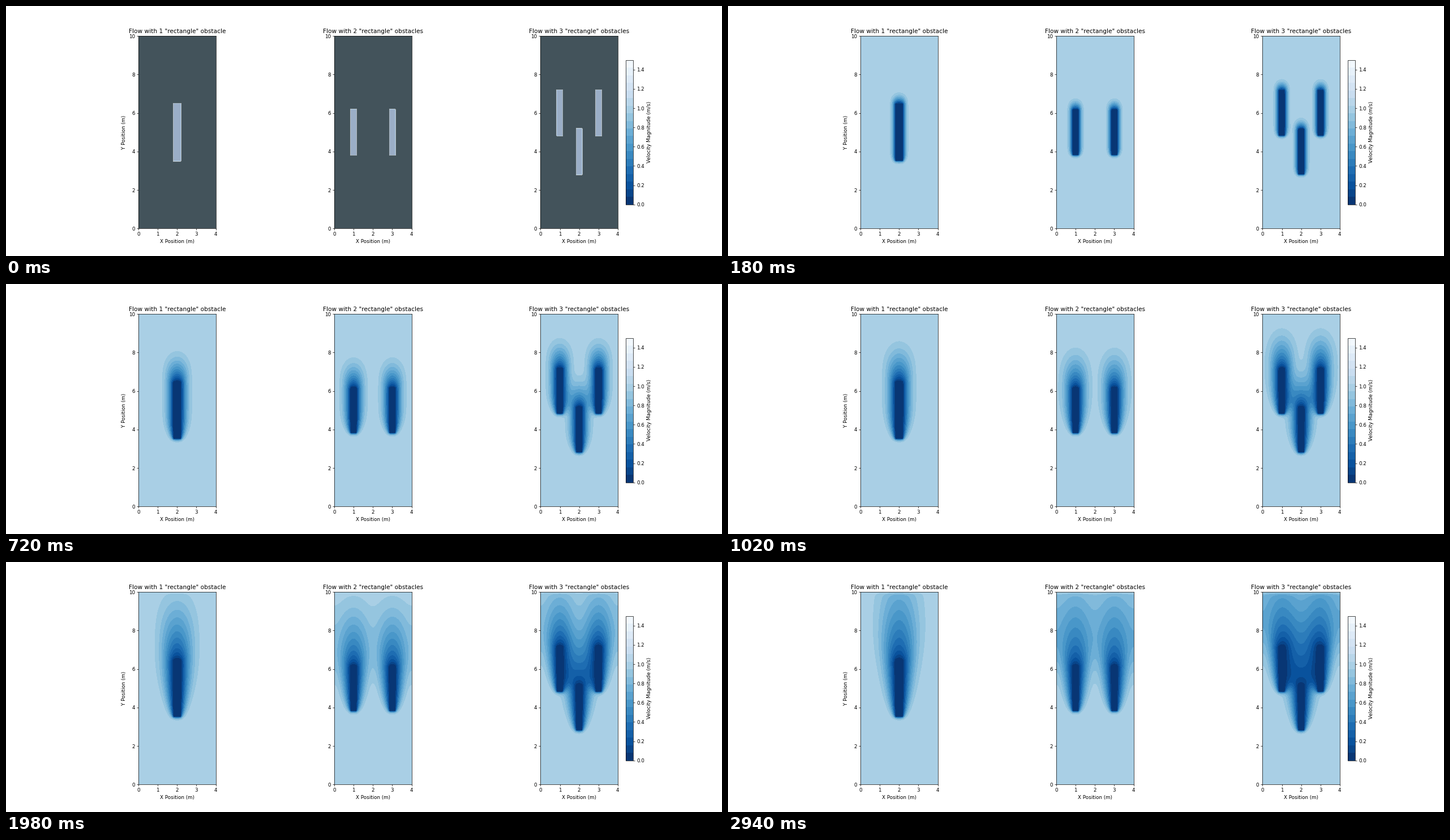
Recreate the animation shown at these times as a matplotlib script. Size 1265 by 443 pixels, loop 3000 ms.

```python
import numpy as np
import matplotlib.pyplot as plt
from matplotlib.animation import FuncAnimation

WIDTH, HEIGHT = 4.0, 10.0
FRAMES, INTERVAL = 50, 60
FRAME_TIME, SUBSTEPS = 0.1, 32
VISCOSITY = 0.04
LEVELS = np.linspace(0, 1.5, 20)

x = np.linspace(0, WIDTH, 200)
y = np.linspace(0, HEIGHT, 200)
X, Y = np.meshgrid(x, y)
dx, dy = x[1] - x[0], y[1] - y[0]


def obstacle_mask(centers, width, height):
    mask = np.zeros(X.shape, dtype=bool)
    for cx, cy in centers:
        mask |= (abs(X - cx) <= width / 2) & (abs(Y - cy) <= height / 2)
    return mask


masks = np.array([
    obstacle_mask([(2, 5)], 0.4, 3.0),
    obstacle_mask([(1, 5), (3, 5)], 0.32, 2.4),
    obstacle_mask([(1, 6), (3, 6), (2, 4)], 0.32, 2.4),
])


def step(v, dt):
    """Upwind Burgers step for the upward velocity, with diffusion."""
    mid = v[:, 1:-1, 1:-1]
    below, above = v[:, :-2, 1:-1], v[:, 2:, 1:-1]
    left, right = v[:, 1:-1, :-2], v[:, 1:-1, 2:]
    diffusion = (left + right - 2 * mid) / dx**2 + (below + above - 2 * mid) / dy**2
    new = v.copy()
    new[:, 1:-1, 1:-1] = mid + dt * (VISCOSITY * diffusion - mid * (mid - below) / dy)
    new[:, :, 0] = new[:, :, 1]
    new[:, :, -1] = new[:, :, -2]
    new[:, 0] = new[:, -1] = 1
    new[masks] = 0
    return new


def simulate():
    v = np.where(masks, 0.0, 1.0)
    states = [v]
    for _ in range(FRAMES - 1):
        for _ in range(SUBSTEPS):
            v = step(v, FRAME_TIME / SUBSTEPS)
        states.append(v)
    return states


states = simulate()

DPI = 63.25
fig, axes = plt.subplots(1, 3, figsize=(1265.01 / DPI, 443.01 / DPI), dpi=DPI)
for count, ax in enumerate(axes, 1):
    plural = "s" if count > 1 else ""
    ax.set_title(f'Flow with {count} "rectangle" obstacle{plural}')
    ax.set(xlim=(0, WIDTH), ylim=(0, HEIGHT), aspect="equal",
           xticks=range(5), yticks=range(0, 11, 2), xlabel="X Position (m)")
axes[0].set_ylabel("Y Position (m)")


def draw_flow(ax, field):
    return ax.contourf(X, Y, field, levels=LEVELS, cmap="Blues_r")


artists = [draw_flow(ax, field) for ax, field in zip(axes, states[0])]
fig.colorbar(artists[-1], ax=axes[2], shrink=0.75, ticks=np.arange(0, 1.5, 0.2),
             label="Velocity Magnitude (m/s)")


def update(frame):
    while artists:
        artists.pop().remove()
    for ax, field, mask in zip(axes, states[frame], masks):
        artists.append(draw_flow(ax, field))
        if frame == 0:
            # The opening picture shows the solid mask over the flow.
            artists.append(ax.contourf(X, Y, mask.astype(float), levels=[-0.1, 0.5, 1.1],
                                       colors=["black", "white"], alpha=0.6))
    return artists


animation = FuncAnimation(fig, update, frames=FRAMES, interval=INTERVAL,
                          repeat=True, repeat_delay=0, blit=False)
plt.show()
```
